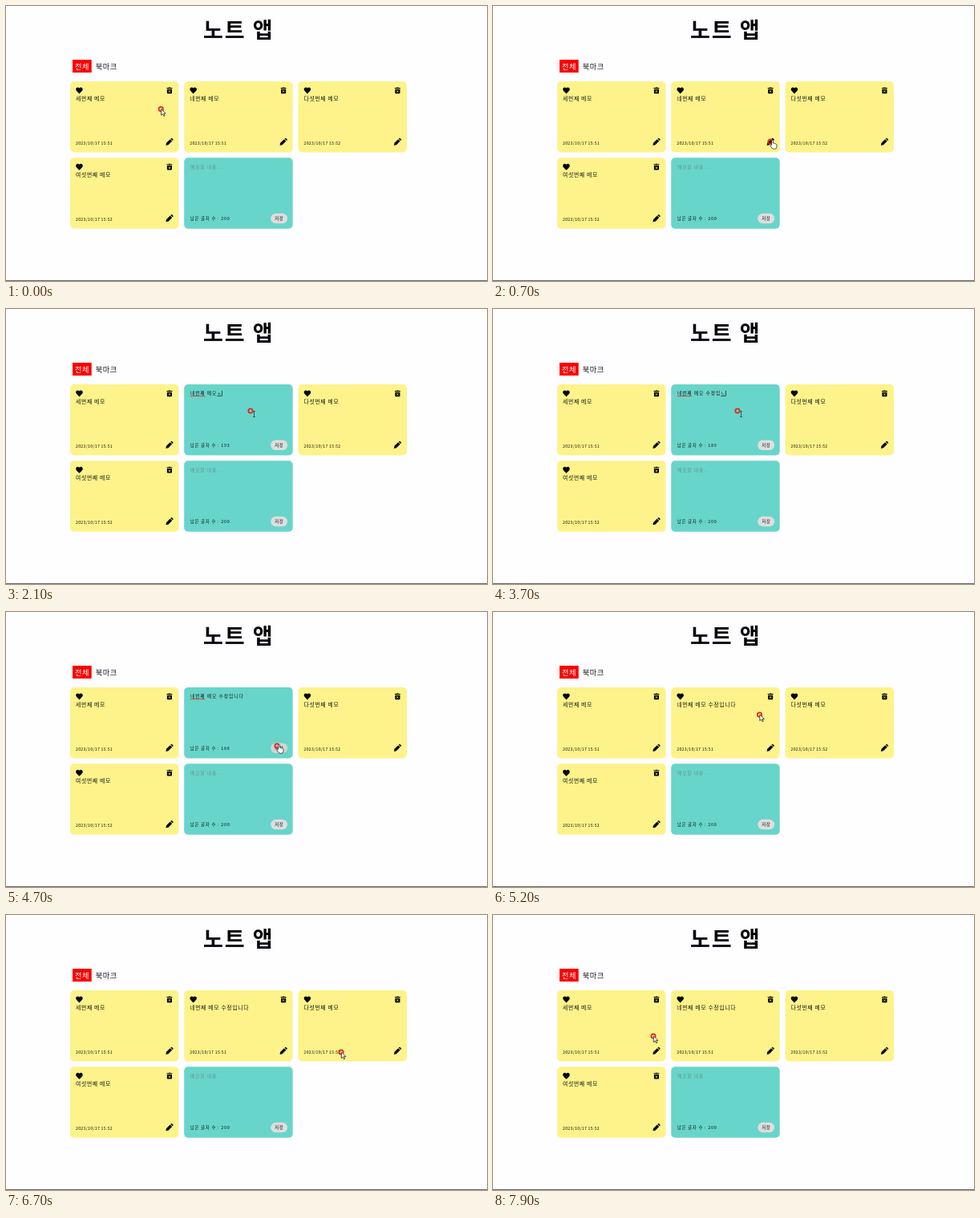
Animation of 600 by 343 pixels, one loop 8 s. Source, as an HTML page with a canvas:

```html
<!DOCTYPE html>
<html lang="ko">
<head>
<meta charset="utf-8">
<title>노트 앱</title>
<style>
html, body { margin: 0; width: 100%; height: 100%; overflow: hidden; background: #fefdff; }
canvas { display: block; width: 600px; height: 343px; }
</style>
</head>
<body>
<canvas id="stage" lang="ko"></canvas>
<script>
const W = 600, H = 343, LOOP = 8000, STEP = 100;
const FONT = '"Noto Sans CJK KR", "Noto Sans KR", "Noto Sans CJK", "Noto Sans CJK JP", sans-serif';
const YELLOW = '#fdf38a', TEAL = '#67d5ca', INK = '#151515';
const canvas = document.getElementById('stage');
const ctx = canvas.getContext('2d');
const dpr = window.devicePixelRatio || 1;
canvas.width = W * dpr;
canvas.height = H * dpr;

const HEART = new Path2D('M12 21.4l-1.5-1.3C5.4 15.4 2 12.3 2 8.5 2 5.4 4.4 3 7.5 3c1.7 0 3.4.8 4.5 2.1C13.1 3.8 14.8 3 16.5 3 19.6 3 22 5.4 22 8.5c0 3.8-3.4 6.9-8.5 11.6z');
const BIN = new Path2D('M4 7.5H20V20q0 2-2 2H6q-2 0-2-2zM3 2.8H8.5L9.5 1.5H14.5L15.5 2.8H21V5.8H3z');
const BIN_CROSS = new Path2D('M9 11.5l6 6.5M15 11.5l-6 6.5');
const PENCIL = new Path2D('M1 23l1.4-7.5L14 4l6 6L8.5 21.6zM15.3 2.7L17 1q1.4-1 2.8 0L23 4.200q1 1.400 0 2.800L21.300 8.700z');
const ARROW = new Path2D('M0 0V7.800L1.900 6.200 3.200 9 4.500 8.400 3.200 5.700H5.600z');
const HAND = new Path2D('M2 5.800V1q0-1 .9-1t.9 1V3.600q1.500-.6 1.800.5 1.300-.3 1.600.6 1.300 0 1.300 1.100V8q0 2.800-2.500 2.800H4.600Q3 10.800 2.300 9.400L.3 6.600q-.2-1.300 1.700-.8z');

// Pointer stops: time, x, y
const ROUTE = [
  [0, 193.3, 128.6], [700, 346, 169], [900, 346, 169], [1000, 335.5, 165.500],
  [1600, 305, 127], [4300, 305, 127], [4700, 338, 167], [4900, 338, 167],
  [5200, 332.5, 128], [5500, 305, 122], [5800, 280, 145], [6100, 330, 160],
  [6300, 400, 222], [6500, 468, 200], [6700, 418, 171], [7000, 181, 166],
  [7300, 198, 168], [7600, 201, 104], [7900, 200, 151]
];

const BASE = '네번째 메모';
// Typing: time, finished text, syllable being composed
const TYPING = [
  [0, '', ''], [2000, '', 'ㅅ'], [2700, '', ''], [2800, ' ', ''], [2900, ' ', 'ㅅ'],
  [3000, ' ', '수'], [3100, ' ', '숮'], [3200, ' 수', '저'], [3300, ' 수', '정'],
  [3500, ' 수정', '이'], [3600, ' 수정', '입'], [3700, ' 수정입', 'ㄴ'],
  [3800, ' 수정입', '니'], [3900, ' 수정입', '닏'], [4000, ' 수정입니', '다']
];

const EDIT_AT = 900, FOCUS_AT = 1700, SAVE_AT = 4900;
const within = (t, a, b) => t >= a && t < b;

function pointerAt(t) {
  const i = ROUTE.findIndex(p => p[0] > t);
  if (i < 0) return ROUTE[ROUTE.length - 1].slice(1);
  const [t0, x0, y0] = ROUTE[i - 1], [t1, x1, y1] = ROUTE[i];
  const k = (t - t0) / (t1 - t0), e = k * k * (3 - 2 * k);
  return [x0 + (x1 - x0) * e, y0 + (y1 - y0) * e];
}

function setFont(size, spacing, weight = 400) {
  ctx.font = `${weight} ${size}px ${FONT}`;
  ctx.letterSpacing = spacing + 'px';
}

function label(str, x, midY, size, spacing, color = INK, weight = 400) {
  setFont(size, spacing, weight);
  ctx.fillStyle = color;
  ctx.fillText(str, x, midY + size * 0.38);
}

function box(x, y, w, h, r, color) {
  ctx.fillStyle = color;
  ctx.beginPath();
  ctx.roundRect(x, y, w, h, r);
  ctx.fill();
}

function at(x, y, scale, draw) {
  ctx.save();
  ctx.translate(x, y);
  ctx.scale(scale, scale);
  draw();
  ctx.restore();
}

function icon(path, x, y, scale) {
  at(x, y, scale, () => {
    ctx.fillStyle = '#050505';
    ctx.fill(path);
  });
}

function noteCard(x, y, text, date) {
  box(x, y, 135.5, 88.5, 5, YELLOW);
  icon(HEART, x + 6.3, y + 6.2, 0.43);
  icon(BIN, x + 119.3, y + 6.8, 0.385);
  at(x + 119.3, y + 6.8, 0.385, () => {
    ctx.strokeStyle = YELLOW;
    ctx.lineWidth = 2;
    ctx.stroke(BIN_CROSS);
  });
  label(text, x + 7, y + 21.2, 6.8, 0.7);
  label(date, x + 7, y + 77, 5.2, 0.3);
  icon(PENCIL, x + 119, y + 70.500, 0.41);
}

function formCard(x, y, left, hover) {
  box(x, y, 135.5, 88.5, 5, TEAL);
  label('남은 글자 수 : ' + left, x + 7.5, y + 76, 5.4, 0.75);
  box(x + 108, y + 69.500, 21, 12.5, 6.25, hover ? '#d2d5d4' : '#dedede');
  label('저장', x + 113, y + 75.700, 5.4, 0.5);
}

function squiggle(x, y, w) {
  ctx.strokeStyle = '#d8322f';
  ctx.lineWidth = 0.8;
  ctx.beginPath();
  for (let i = 0; i <= w; i++) ctx.lineTo(x + i, y + (i % 2 ? 0.6 : -0.6));
  ctx.stroke();
}

function editor(x, y, t) {
  const [, done, live] = TYPING.filter(s => s[0] <= t).pop();
  const typed = done + live;
  const left = typed ? 200 - (BASE + typed).length : t >= 2700 ? 194 : 200;
  formCard(x, y, left, t < 1200 || t >= 4600);
  const tx = x + 7.7, ty = y + 11;
  label(BASE + typed, tx, ty, 5.7, 1);
  if (t < FOCUS_AT) return;
  const width = s => ctx.measureText(s).width;
  if (t >= 2000) squiggle(tx, ty + 3.6, width('네번째'));
  ctx.fillStyle = INK;
  if (live && t < 4400) ctx.fillRect(tx + width(BASE + done), ty + 3, width(live) - 0.5, 0.7);
  const caretOn = within(t, 1800, 2500) || within(t, 2700, 4100);
  if (caretOn) ctx.fillRect(tx + width(BASE + typed) - 0.3, ty - 3.2, 0.7, 6.6);
}

function outlined(path, x, y) {
  at(x, y, 1, () => {
    ctx.fillStyle = '#fff';
    ctx.strokeStyle = '#222';
    ctx.lineWidth = 0.8;
    ctx.fill(path);
    ctx.stroke(path);
  });
}

function beam(x, y) {
  ctx.strokeStyle = '#333';
  ctx.lineWidth = 0.8;
  ctx.beginPath();
  ctx.moveTo(x, y - 3.5);
  ctx.lineTo(x, y + 3.5);
  for (const dy of [-3.5, 3.5]) {
    ctx.moveTo(x - 1.3, y + dy);
    ctx.lineTo(x + 1.3, y + dy);
  }
  ctx.stroke();
}

function pointer(t) {
  const [x, y] = pointerAt(t);
  const pressed = within(t, 800, 1100) || within(t, 4800, 5000);
  ctx.strokeStyle = pressed ? 'rgba(255,255,255,.75)' : '#e3241d';
  ctx.lineWidth = 1.7;
  ctx.beginPath();
  ctx.arc(x, y, 2.7, 0, Math.PI * 2);
  ctx.stroke();
  if (within(t, 600, 1200) || within(t, 4600, 5000)) outlined(HAND, x - 0.5, y - 1.5);
  else if (within(t, 1200, 4600)) beam(x + 4.5, y + 4);
  else outlined(ARROW, x + 0.3, y - 0.2);
}

function draw(t) {
  ctx.setTransform(dpr, 0, 0, dpr, 0, 0);
  ctx.fillStyle = '#fefdff';
  ctx.fillRect(0, 0, W, H);
  ctx.fillStyle = '#666';
  ctx.fillRect(0, 342, W, 1);

  label('노트 앱', 246, 30, 27, 2, '#050505', 700);
  box(83, 67, 23.700, 16, 0, '#f90000');
  label('전체', 86, 75.200, 9.2, 0.5, '#fff');
  label('북마크', 111.8, 75.200, 9.2, 0.5);

  noteCard(80, 94, '세번째 메모', '2023/10/17 15:51');
  if (within(t, EDIT_AT, SAVE_AT)) editor(222.2, 94, t);
  else noteCard(222.2, 94, t < EDIT_AT ? BASE : BASE + ' 수정입니다', '2023/10/17 15:51');
  noteCard(364.5, 94, '다섯번째 메모', '2023/10/17 15:52');
  noteCard(80, 189.3, '여섯번째 메모', '2023/10/17 15:52');
  formCard(222.2, 189.3, 200, false);
  label('메모할 내용...', 229.9, 200.5, 5.7, 1, '#6b8e8a');

  pointer(t);
}

function tick() {
  const t = performance.now() % LOOP;
  draw(Math.floor(t / STEP) * STEP);
  requestAnimationFrame(tick);
}
tick();
</script>
</body>
</html>
```
